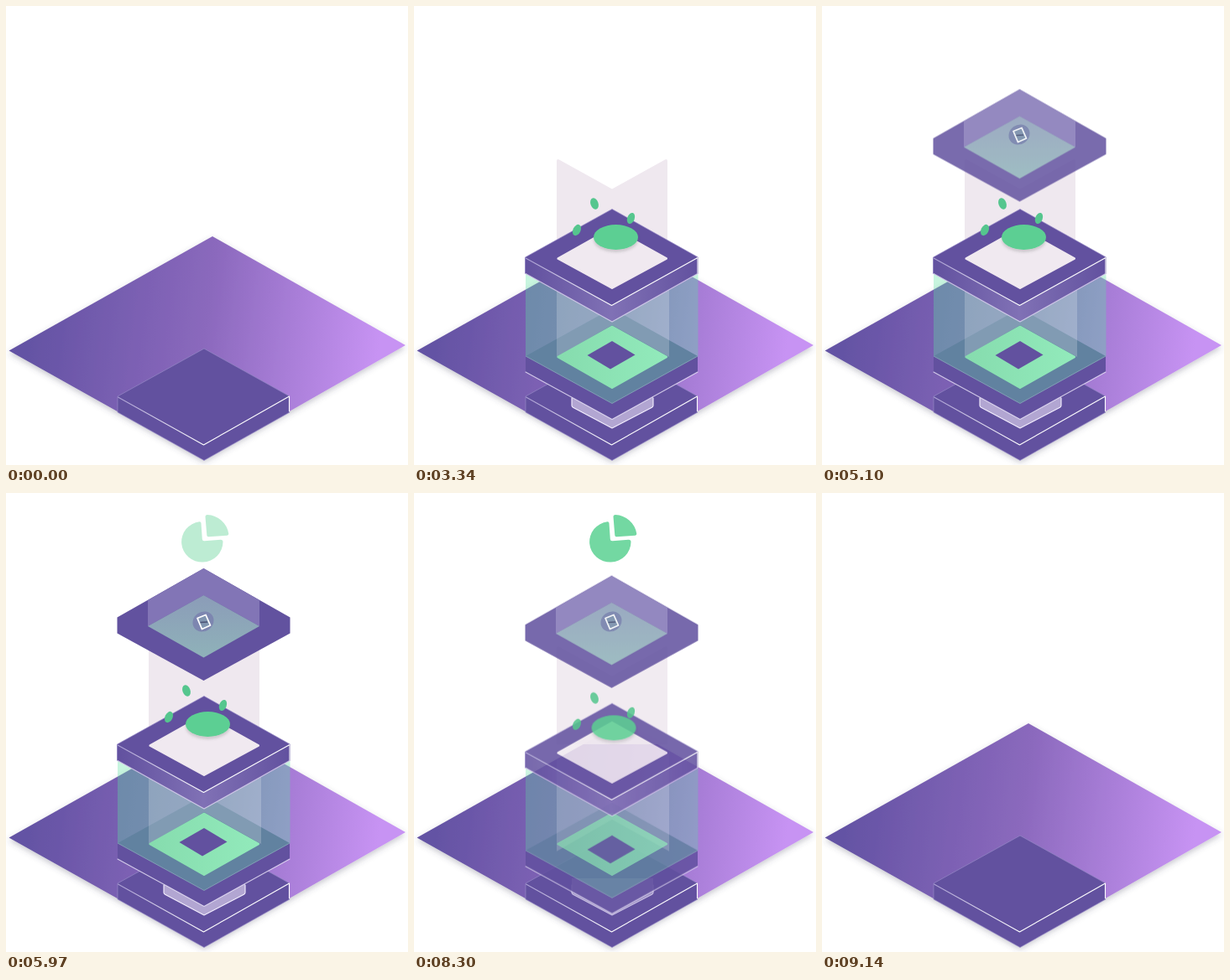
Write an HTML page that moves like this. It is 479x548 px and loops after 9.22 s.

```html
<!DOCTYPE html>
<html lang="en">
<head>
<meta charset="utf-8">
<title>Isometric stack</title>
<style>
html, body { margin: 0; width: 100%; height: 100%; overflow: hidden; background: #fff; }
svg { display: block; width: 479px; height: 548px; }

/* Every part shares one 9220 ms cycle */
.in, .out { animation: 9220ms linear infinite both; }
.tower { animation-name: tower; }
.plinth { animation-name: plinth; }
.deck { animation-name: deck; }
.beam { animation-name: beam; }
.roof { animation-name: roof; }
.badge { animation-name: badge; }
.pie { animation-name: pie; }
.fade { animation-name: fade; }
.sink { animation-name: sink; }
.slide { animation-name: slide; }
.quick { animation-name: quick; }

@keyframes tower { 0%, 1.1% { opacity: 0; } 11.3%, 100% { opacity: 1; } }
@keyframes plinth { 0%, 11.5% { opacity: 0; } 17.4%, 100% { opacity: 1; } }
@keyframes deck { 0%, 19.5% { opacity: 0; } 26.2%, 100% { opacity: 1; } }
@keyframes beam { 0%, 32.3% { opacity: 0; } 36.2%, 100% { opacity: 1; } }
@keyframes roof {
  0%, 45.4% { opacity: 0; transform: translateY(64px); }
  57.05%, 100% { opacity: 1; transform: none; }
}
@keyframes badge { 0%, 45.4% { opacity: 0; } 57.05%, 100% { opacity: 1; } }
@keyframes pie { 0%, 60.7% { opacity: 0; } 70.8%, 100% { opacity: 1; } }

@keyframes fade { 0%, 88.7% { opacity: 1; } 98.5%, 100% { opacity: 0; } }
@keyframes quick { 0%, 88.7% { opacity: 1; } 93.3%, 100% { opacity: 0; } }
@keyframes sink {
  0%, 88.7% { opacity: 1; transform: translate(0, 0); }
  98.5%, 100% { opacity: 0; transform: translate(0, 64px); }
}
@keyframes slide {
  0%, 88.7% { opacity: 1; transform: translate(0, 0); }
  98.5%, 100% { opacity: 0; transform: translate(-18px, 32px); }
}

.edge { fill: none; stroke: #f4efff; stroke-width: 1.1; stroke-linejoin: round; stroke-linecap: round; }
.back { fill: none; stroke: #9688c6; stroke-width: .7; }
.round { stroke-width: 3; stroke-linejoin: round; }
</style>
</head>
<body>
<svg viewBox="0 0 479 548">
  <defs>
    <linearGradient id="floor" gradientUnits="userSpaceOnUse" x1="30" y1="385" x2="440" y2="440">
      <stop offset="0" stop-color="#6453a4"/>
      <stop offset=".5" stop-color="#8b69bd"/>
      <stop offset="1" stop-color="#c793f3"/>
    </linearGradient>
    <linearGradient id="rim" gradientUnits="userSpaceOnUse" x1="133" y1="0" x2="338" y2="0">
      <stop offset="0" stop-color="#62519f"/>
      <stop offset=".5" stop-color="#8071b5"/>
      <stop offset="1" stop-color="#62519f"/>
    </linearGradient>
    <linearGradient id="line" gradientUnits="userSpaceOnUse" x1="133" y1="0" x2="338" y2="0">
      <stop offset="0" stop-color="#a99dd2"/>
      <stop offset=".5" stop-color="#fff"/>
      <stop offset="1" stop-color="#fff"/>
    </linearGradient>
    <linearGradient id="mint" x1="0" y1="0" x2="1" y2="0">
      <stop offset="0" stop-color="#86dcae"/>
      <stop offset="1" stop-color="#92eabb"/>
    </linearGradient>
    <linearGradient id="screen" x1="0" y1="0" x2="0" y2="1">
      <stop offset="0" stop-color="#8b9cb8"/>
      <stop offset="1" stop-color="#8fb2b9"/>
    </linearGradient>
    <filter id="shadow" x="-10%" y="-10%" width="120%" height="120%">
      <feDropShadow dx="0" dy="3" stdDeviation="3.5" flood-color="#4a4a60" flood-opacity=".3"/>
    </filter>
    <filter id="soft" x="-20%" y="-20%" width="140%" height="170%">
      <feDropShadow dx="0" dy="3" stdDeviation="1.5" flood-color="#666" flood-opacity=".25"/>
    </filter>
  </defs>

  <!-- Floor and base -->
  <path d="M246 275L476 405L236 542L3.5 411.500Z" fill="url(#floor)" filter="url(#shadow)"/>
  <path d="M236 409L338 466V485L236 542.500L133 485V466Z" fill="#62519f"/>
  <path class="back" d="M133 485V466L236 409L338 466"/>
  <path class="edge" style="stroke:url(#line)" d="M133.500 467L235.500 524L337.500 466V484"/>
  <path class="back" d="M133 485L236 542.500L338 485"/>

  <!-- Plinth -->
  <g class="out quick"><g class="in plinth">
    <path d="M188 460H285V477Q285 478.500 283.500 479.300L236 504L189.500 479.300Q188 478.500 188 477Z" fill="#b2a6d2"/>
    <path class="edge" d="M188 468V477Q188 478.500 189.500 479.300L236 504L283.500 479.300Q285 478.500 285 477V468"/>
  </g></g>

  <!-- Glass tower -->
  <g class="out sink"><g class="in tower">
    <path d="M236 361L338 418V437L236 493.500L133 437V418Z" fill="#62519f"/>
    <path class="edge" style="stroke-opacity:.75" d="M133 437L236 493.500L338 437"/>
    <path d="M133 320L236 377L338.500 320V418L236 474.500L133 418Z" fill="#5fe0a0" fill-opacity=".34"/>
    <path class="back" style="stroke:#8fb0bd" d="M133 418L236 474.500L338 418"/>
    <path d="M170 300L236 338L304 300V419L236 381L170 419Z" fill="#fff" fill-opacity=".2"/>
  </g></g>
  <g class="out quick"><g class="in tower">
    <path class="round" d="M236 383L300.500 419L236 455.500L172 419Z" fill="url(#mint)" stroke="url(#mint)"/>
  </g></g>
  <g class="out sink"><g class="in tower">
    <path d="M236 400L263.500 416.500L234 433.500L206.500 417Z" fill="#62519f"/>
  </g></g>

  <!-- Pale beam -->
  <g class="out fade"><g class="in beam">
    <path d="M170 300V185.500Q170 182 173 183.500L236 218.500L299 183.500Q302 182 302 185.500V300Z" fill="#efe8ef"/>
  </g></g>

  <!-- Middle deck -->
  <g class="out sink">
    <g class="in deck">
      <path d="M236 242.500L338.500 300V319.500L236 377L132.500 319.500V300Z" fill="#62519f"/>
      <path d="M132.500 300L236 357.500L338.500 300V319.500L236 377L132.500 319.500Z" fill="url(#rim)"/>
      <path class="back" d="M132.500 320V300L236 242.500L338.500 300"/>
      <path class="edge" style="stroke:url(#line)" d="M133 301L235.500 357.500L338 300.500V319"/>
      <path class="edge" style="stroke-opacity:.7" d="M133 319.500L236 377L338 319.500"/>
    </g>
    <path class="in beam round" d="M236 265.500L300.500 301.500L236 336.500L172 301.500Z" fill="#f0e9f0" stroke="#f0e9f0"/>
  </g>
  <g class="out slide"><g class="in deck">
    <ellipse cx="240.500" cy="276" rx="26.500" ry="15" fill="#5bcf93" filter="url(#soft)"/>
  </g></g>
  <g class="out sink"><g class="in deck" fill="#55c68e">
    <ellipse rx="4.600" ry="7" transform="translate(215 236) rotate(-20)"/>
    <ellipse rx="4.300" ry="6.800" transform="translate(258.500 253.500) rotate(20)"/>
    <ellipse rx="4.500" ry="7" transform="translate(194 267.500) rotate(25)"/>
  </g></g>

  <!-- Roof -->
  <g class="out sink"><g class="in roof">
    <path d="M235.500 90L338.500 148.500V167.500L235.500 224L132.500 167.500V148.500Z" fill="#62529f"/>
    <path d="M169 128L235.500 90L302 128V159L235.500 122L169 159Z" fill="#8275b6"/>
    <path d="M235.500 122L302 159L235.500 196.500L169 159Z" fill="url(#screen)"/>
  </g></g>
  <g class="out fade"><g class="in badge">
    <ellipse rx="13" ry="11.500" transform="translate(235 153.500) rotate(-35)" fill="#7d86b0"/>
    <path d="M228 149.500L238 145.500L243.500 158L233.500 162.500Z" fill="#8195b0" stroke="#fff" stroke-width="1.800" stroke-linejoin="round"/>
    <path d="M231.500 154.500L240 154" stroke="#4b5275" stroke-width="1.400"/>
  </g></g>

  <!-- Pie chart -->
  <g class="out fade"><g class="in pie" fill="#5dd294">
    <path d="M230.500 34.200A24.700 24.300 0 1 0 258.500 58.500Q258.500 55.500 255.500 55.700L236.500 57.300Q234 57.500 233.800 55L232.500 36Q232.300 34 230.500 34.200Z"/>
    <path d="M240 26A27 27 0 0 1 265.300 48.500Q265.500 50.500 263.500 50.700L241.500 52.300Q239.500 52.500 239.300 50.500L237.500 28.500Q237.400 26 240 26Z"/>
  </g></g>
</svg>
</body>
</html>
```
